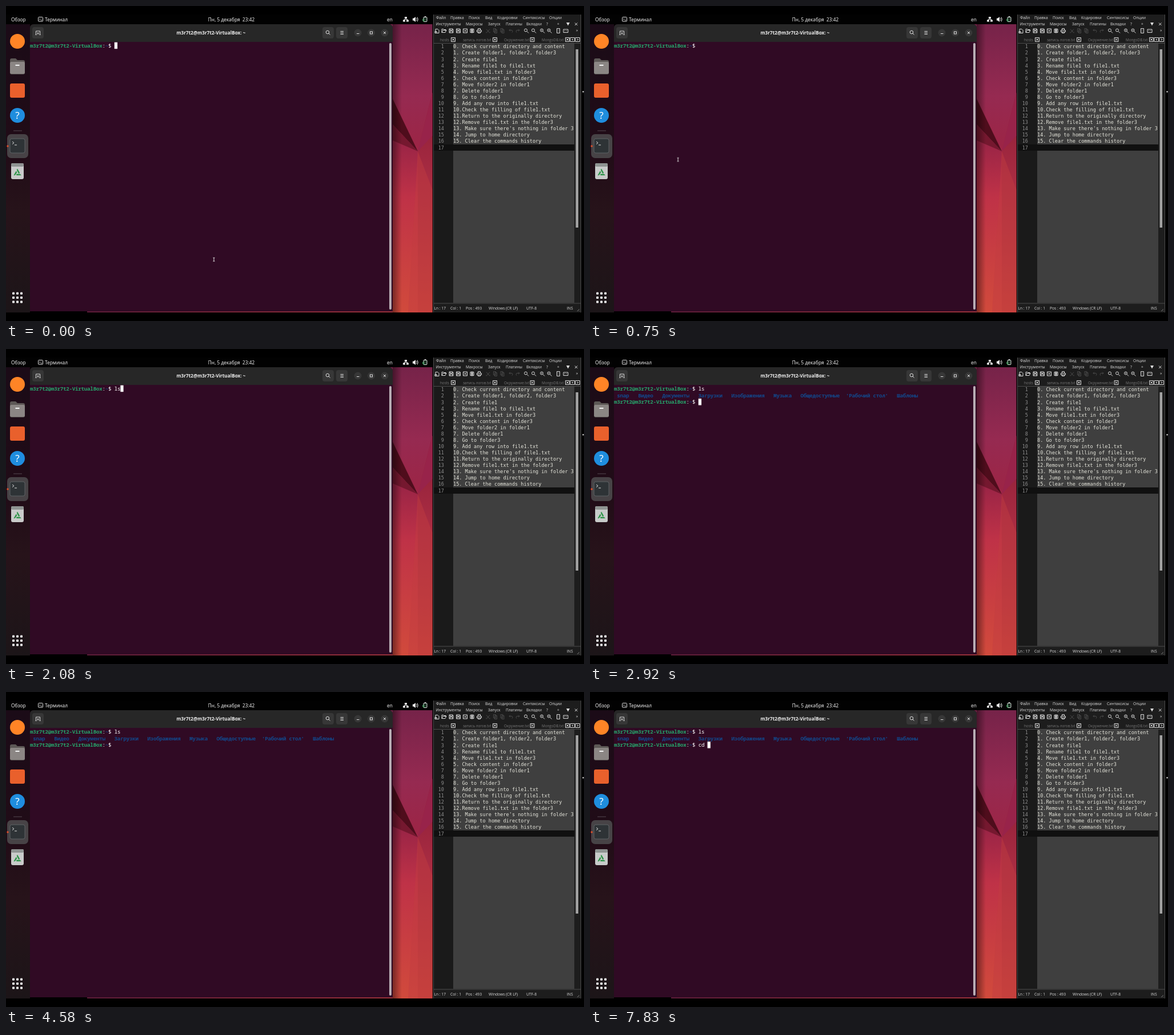
Recreate the animation shown at these times as an HTML page. Size 1012 px wide and 553 px high, loop 8000 ms.

```html
<!DOCTYPE html>
<html lang="ru">
<head>
<meta charset="utf-8">
<title>Терминал</title>
<style>
html, body { margin: 0; width: 100%; height: 100%; overflow: hidden; background: #000; }
svg { display: block; width: 1012px; height: 553px; }
text { white-space: pre; }
.ui { font: 8.3px "Noto Sans", sans-serif; fill: #eee; }
.menu { font: 6.7px "Open Sans", sans-serif; fill: #ddd; }
.tab { font: 6.3px "Open Sans", sans-serif; fill: #777; }
.term { font: 9.3px "Noto Sans Mono", monospace; letter-spacing: -.31px; fill: #fff; }
.host { font-weight: 700; fill: #26a269; }
.dir { font-weight: 700; fill: #12488b; }
.code { font: 8.55px "DejaVu Sans Mono", monospace; fill: #e6e6dc; }
.num { fill: #8c8c8c; text-anchor: end; }
.line { fill: none; stroke: #ddd; stroke-width: 1; }
.dim { stroke: #484848; }

/* one loop = 8 s, 1% = 80 ms */
.l, .s, .out, .c, .d, #caret { animation: 8s step-end infinite; }
.l { animation-name: l; }
.s { animation-name: s; }
.out { animation-name: out; }
.c { animation-name: c; }
.d { animation-name: d; }
@keyframes l { 0% { opacity: 0 } 22.5%, 100% { opacity: 1 } }
@keyframes s { 0% { opacity: 0 } 26%, 100% { opacity: 1 } }
@keyframes out { 0% { opacity: 0 } 32.25%, 100% { opacity: 1 } }
@keyframes c { 0% { opacity: 0 } 69.8%, 100% { opacity: 1 } }
@keyframes d { 0% { opacity: 0 } 76%, 100% { opacity: 1 } }

#caret { animation-name: caret, blink; }
@keyframes caret {
  0% { transform: translate(0, 0) }
  22.5% { transform: translate(5.27px, 0) }
  26% { transform: translate(10.54px, 0) }
  32.25% { transform: translate(0, 23.4px) }
  69.8% { transform: translate(5.27px, 23.4px) }
  76% { transform: translate(10.54px, 23.4px) }
  82.25%, 100% { transform: translate(15.81px, 23.4px) }
}
@keyframes blink {
  0%, 13.125%, 22.5%, 47.75%, 62.5%, 96.875%, 100% { opacity: 1 }
  5.625%, 20.625%, 40.25%, 55.25%, 88.5% { opacity: 0 }
}
#mouse { animation: move 8s infinite, hide 8s step-end infinite; }
@keyframes move {
  0% { transform: translate(364px, 445px); animation-timing-function: cubic-bezier(.4, 0, .75, .8) }
  9.375% { transform: translate(154px, 270px); animation-timing-function: cubic-bezier(.25, .3, .5, 1) }
  16.6%, 100% { transform: translate(188px, 72px) }
}
@keyframes hide { 0% { opacity: 1 } 22.5%, 100% { opacity: 0 } }
</style>
</head>
<body>
<svg viewBox="0 0 1012 553">
  <defs>
    <linearGradient id="wall" x1="0" y1="0" x2="0" y2="1">
      <stop offset="0" stop-color="#762349"/><stop offset=".25" stop-color="#962a51"/>
      <stop offset=".42" stop-color="#9c2546"/><stop offset=".6" stop-color="#bf3247"/>
      <stop offset="1" stop-color="#d14a3c"/>
    </linearGradient>
    <linearGradient id="fold" x1="0" y1="0" x2="0" y2="1">
      <stop offset="0" stop-color="#8a1d38"/><stop offset=".4" stop-color="#a92c42"/>
      <stop offset="1" stop-color="#c9443a"/>
    </linearGradient>
    <linearGradient id="shade">
      <stop offset="0" stop-opacity=".42"/><stop offset="1" stop-opacity="0"/>
    </linearGradient>
    <linearGradient id="strip">
      <stop offset="0" stop-color="#5c1c38"/><stop offset="1" stop-color="#98303a"/>
    </linearGradient>
    <linearGradient id="dock" x1="0" y1="0" x2="0" y2="1">
      <stop offset="0" stop-color="#1b0b17"/><stop offset=".45" stop-color="#210c17"/>
      <stop offset=".65" stop-color="#27131a"/><stop offset="1" stop-color="#1c1518"/>
    </linearGradient>
  </defs>
  <rect width="1012" height="553"/>

  <!-- wallpaper -->
  <rect x="670" y="32" width="76.500" height="506" fill="url(#wall)"/>
  <path d="M746.500 152L721 255V538H746.500Z" fill="url(#fold)"/>
  <path d="M746.500 152L721 255L746.500 228Z" fill="#98234a"/>
  <path d="M721 255L746.500 322V538H704Z" fill="#c23c42" opacity=".45"/>
  <path d="M677 163L721 255L677 208Z" fill="#4f0d1c"/>
  <path d="M677 208L721 255L677 236Z" fill="#75182f"/>
  <rect x="677" y="32" width="16" height="506" fill="url(#shade)"/>

  <!-- dock -->
  <rect y="32" width="42" height="506" fill="url(#dock)"/>
  <circle cx="20" cy="62" r="13" fill="#ff8426"/>
  <path d="M7 95q0-3 3-3h7l3 3h10q3 0 3 3v19q0 3-3 3H10q-3 0-3-3z" fill="#5d5856"/>
  <rect x="7" y="98" width="26" height="21" rx="2.5" fill="#8b8684"/>
  <rect x="16.5" y="103" width="7" height="2" fill="#f2f2f2"/>
  <rect x="7" y="136" width="26" height="25" rx="3" fill="#e9602c"/>
  <circle cx="20" cy="192" r="13" fill="#1f8dde"/>
  <text x="20" y="198" text-anchor="middle" font-family="Noto Sans, sans-serif" font-size="17" fill="#fff">?</text>
  <path d="M13 219h15" stroke="#554850"/>
  <rect x="2" y="225" width="37" height="42" rx="7" fill="#474346"/>
  <rect x="7" y="233" width="26" height="25" rx="3" fill="#2e3336" stroke="#5d6265"/>
  <path d="M11 238l3 2.3l-3 2.3M15 244h4" class="line"/>
  <circle cx="3" cy="246" r="1.7" fill="#e0522b"/>
  <rect x="9" y="276" width="22" height="28" rx="3" fill="#c9cbca"/>
  <rect x="9" y="276" width="22" height="6" rx="2" fill="#8f9492"/>
  <path d="M20 288l4.5 8h-9z" fill="none" stroke="#2d9448" stroke-width="2.4" stroke-dasharray="6.5 2.4"/>
  <g id="apps" fill="#f4f4f4"></g>

  <!-- top bar -->
  <rect y="15" width="748" height="17" fill="#020202"/>
  <g class="ui">
    <text x="9" y="26.5">Обзор</text>
    <text x="68" y="26.5">Терминал</text>
    <text x="394.5" y="26.5" text-anchor="middle">Пн, 5 декабря  23:42</text>
    <text x="667" y="26.5">en</text>
  </g>
  <rect x="56.500" y="19.500" width="8" height="7.500" rx="1" class="line"/>
  <path d="M58.500 22l1.500 1.300l-1.500 1.300M61 25h2" class="line" stroke-width=".8"/>
  <path d="M698 19h4v3h-4zM695 24.500h4v3h-4zM701 24.500h4v3h-4z" fill="#eee"/>
  <path d="M700 22v1.500M697 25v-1.500h6V25" class="line"/>
  <path d="M712 21.500h2l3-2.500v9l-3-2.500h-2z" fill="#eee"/>
  <path d="M718.500 21q2 2.300 0 5M720 19.500q3 4 0 8" class="line" stroke-width=".8"/>
  <rect x="731" y="19.500" width="6" height="8" rx="1" fill="#1b3324" stroke="#ddd"/>
  <path d="M733 18.500h2" class="line"/>
  <path d="M731 22l-2 3h3l-1 3" stroke="#3fae62" fill="none"/>

  <!-- terminal window -->
  <rect x="142" y="536" width="535" height="2" fill="url(#strip)"/>
  <path d="M42 536V39q0-7 7-7h621q7 0 7 7V536z" fill="#300a24"/>
  <path d="M42 63V39q0-7 7-7h621q7 0 7 7V63z" fill="#272727"/>
  <g fill="#373737">
    <rect x="46" y="37" width="20" height="20" rx="4"/>
    <rect x="554" y="37" width="20" height="20" rx="4"/>
    <rect x="578" y="37" width="20" height="20" rx="4"/>
    <circle cx="616" cy="47" r="6.500"/><circle cx="639.500" cy="47" r="6.500"/><circle cx="663" cy="47" r="6.500"/>
  </g>
  <g class="line">
    <path d="M52.500 50.500v-6.500h7v6.500M51.500 50.500h2M58.500 50.500h2M56 46v4M54.500 48h3"/>
    <circle cx="563" cy="46" r="2.800"/><path d="M565 48l2.500 2.500"/>
    <path d="M585.500 44.500h5.500M585.500 47h5.500M585.500 49.500h5.500"/>
    <path d="M614 48.500h4.500"/><rect x="637.500" y="45" width="4" height="4"/>
    <path d="M661 45l4 4M665 45l-4 4"/>
  </g>
  <text class="ui" x="359" y="50" text-anchor="middle" style="font-weight:700;font-size:8.2px">m3r7t2@m3r7t2-VirtualBox: ~</text>
  <rect x="671" y="65" width="4" height="468" rx="2" fill="#b8adb4"/>

  <g class="term">
    <g id="prompt">
      <text class="host" x="42" y="73">m3r7t2@m3r7t2-VirtualBox</text>
      <text x="168.500" y="73">:</text>
      <text class="dir" x="173.800" y="73">~</text>
      <text x="179" y="73">$</text>
    </g>
    <text class="l" x="189.800" y="73">l</text>
    <text class="s" x="195" y="73">s</text>
    <g class="out">
      <g id="dirs" class="dir"></g>
      <use href="#prompt" y="23.400"/>
    </g>
    <text class="c" x="189.800" y="96.400">c</text>
    <text class="d" x="195" y="96.400">d</text>
  </g>
  <rect id="caret" x="189.800" y="63.700" width="5.300" height="11.500" fill="#fff"/>
  <path id="mouse" d="M-1.500-3h3M0-3v6M-1.500 3h3" stroke="#ddd" fill="none"/>

  <!-- editor -->
  <rect x="748" y="15" width="258" height="523" fill="#1d1d1d"/>
  <rect x="749" y="66" width="34" height="455" fill="#1a1a1a"/>
  <rect x="783" y="66" width="212" height="455" fill="#3f3f3f"/>
  <rect x="749" y="243" width="246" height="11" fill="#101010"/>
  <path d="M748.500 15V538M1006.500 15V538M749 65.500H1006M749 522H1006" stroke="#4c4c4c" fill="none"/>
  <rect x="997.500" y="76" width="4.500" height="313" fill="#a3a3a3"/>
  <rect x="1009" y="149.500" width="3" height="2" fill="#bbb"/>
  <g id="menu" class="menu"></g>
  <path d="M981 29h6l-3 5.500z" fill="#ddd"/>
  <path d="M996 29.500l4.500 4.500M1000.500 29.500l-4.500 4.500" class="line" stroke-width=".8"/>
  <g id="tools"></g>
  <g id="tabs" class="tab"></g>
  <g id="code" class="code"></g>
  <path d="M1004 532l-4 4M1004 535l-1 1" stroke="#777"/>
</svg>
<script>
const add = (id, markup) => document.getElementById(id).innerHTML += markup;
const label = (x, y, s, cls = '') => `<text x="${x}" y="${y}" class="${cls}">${s}</text>`;
const row = (id, y, items) => items.forEach(([x, s]) => add(id, label(x, y, s)));

for (let i = 0; i < 9; i++)
  add('apps', `<rect x="${11 + i % 3 * 7}" y="${502.5 + (i / 3 | 0) * 7.5}" width="4" height="4" rx="1"/>`);

row('dirs', 84.7, [[47.3, 'snap'], [84.2, 'Видео'], [126.3, 'Документы'], [189.6, 'Загрузки'],
  [247.5, 'Изображения'], [321.3, 'Музыка'], [368.5, 'Общедоступные'], [448, "'Рабочий стол'"], [537.2, 'Шаблоны']]);

row('menu', 22.5, [[753, 'Файл'], [778, 'Правка'], [810, 'Поиск'], [839, 'Вид'],
  [860, 'Кодировки'], [905, 'Синтаксисы'], [951, 'Опции']]);
row('menu', 34.3, [[752.5, 'Инструменты'], [805, 'Макросы'], [844, 'Запуск'], [875, 'Плагины'],
  [911, 'Вкладки'], [946, '?'], [965, '+']]);
row('menu', 533, [[749.5, 'Ln : 17'], [778, 'Col : 1'], [805, 'Pos : 493'],
  [845, 'Windows (CR LF)'], [911, 'UTF-8'], [982, 'INS']]);
row('menu', 45, [[998, '»']]);
row('tabs', 61.5, [[760, 'hosts'], [800, 'запись логов.txt'], [872, 'Окружение.txt'], [938, 'MongoDB.txt']]);

const shape = {
  new: 'M-3-3h4l2 2v5h-6zM-4 1h3v3h-3z',
  open: 'M-4 3v-6h3l1 1h3v2M-4 3l2-4h6l-2 4z',
  save: 'M-3.500-3.500h6l1 1v6h-7zM-2-3v2h4v-2M-2 3v-2.500h4v2.500',
  close: 'M-3.500-3.500h7v7h-7zM-2-2l4 4M2-2l-4 4',
  all: 'M-3-3h6v6h-6zM-1-1h2v2h-2zM-1-4v8M1-4v8',
  print: 'M-4-1h8v3h-8zM-2-1v-3h4v3M-2 1v3h4v-3',
  cut: 'M-3-3l5 6M3-3l-5 6M-3 2v2M3 2v2',
  copy: 'M-3-4h4v6h-4zM-1-2h4v6h-4z',
  undo: 'M-3-1h5q2 2 0 4M-1-3l-2 2l2 2',
  redo: 'M3-1h-5q-2 2 0 4M1-3l2 2l-2 2',
  find: 'M-3.500-1a2.500 2.500 0 1 0 5 0a2.500 2.500 0 1 0-5 0M1 1l3 3',
  zoom: 'M-3.500-1a2.500 2.500 0 1 0 5 0a2.500 2.500 0 1 0-5 0M1 1l3 3M-2-1h2',
  tall: 'M-2.500-4h5v8h-5zM0-2v1M0 1v1',
  wide: 'M-4-2.500h8v5.500h-8zM-2 0h1M1 0h1'
};
const icon = (name, x, y, cls = '') =>
  `<path class="line ${cls}" transform="translate(${x} ${y})" d="${shape[name]}"/>`;
[['new', 755], ['open', 767], ['save', 779.5], ['save', 792], ['close', 804], ['all', 816], ['print', 828.5],
  ['cut', 844, 'dim'], ['copy', 856.5, 'dim'], ['copy', 869, 'dim'], ['undo', 884, 'dim'], ['redo', 896, 'dim'],
  ['find', 911], ['find', 924], ['zoom', 939], ['zoom', 951.5], ['tall', 967], ['wide', 980]
].forEach(([name, x, cls]) => add('tools', icon(name, x, 43.5, cls)));

[783, 856, 921.5, 983].forEach(x => add('tools', icon('close', x, 59)));
[992, 1001].forEach((x, i) => add('tools',
  `<path class="line" d="M${x - 4} 55.500h7.500v7h-7.500zM${x + 1 - 2 * i} 57.500l${4 * i - 2} 1.500l${2 - 4 * i} 1.500"/>`));

`0. Check current directory and content
1. Create folder1, folder2, folder3
2. Create file1
3. Rename file1 to file1.txt
4. Move file1.txt in folder3
5. Check content in folder3
6. Move folder2 in folder1
7. Delete folder1
8. Go to folder3
9. Add any row into file1.txt
10.Check the filling of file1.txt
11.Return to the originally directory
12.Remove file1.txt in the folder3
13. Make sure there's nothing in folder 3
14. Jump to home directory
15. Clear the commands history
`.split('\n').forEach((s, i) => {
  const y = 74.4 + i * 11.07;
  add('code', label(767, y, i + 1, 'num') + label(783, y, s));
});
</script>
</body>
</html>
```
